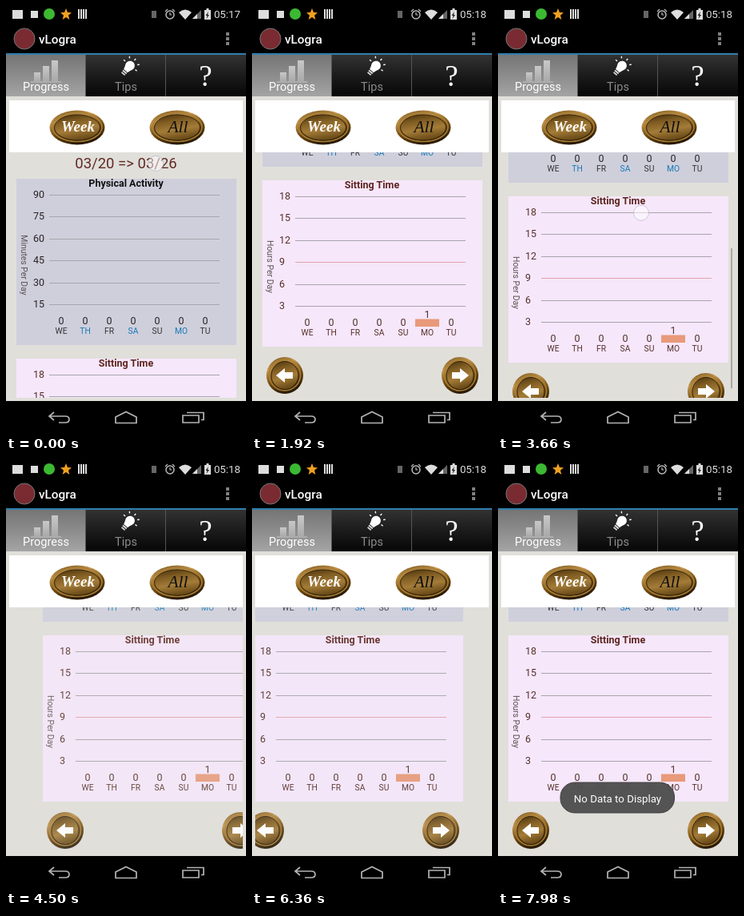
Animation, 300 px wide and 534 px high, one loop 8000 ms. Source, as an HTML page:

```html
<!DOCTYPE html>
<html lang="en">
<head>
<meta charset="utf-8">
<title>vLogra</title>
<style>
html, body { margin: 0; height: 100%; overflow: hidden; background: #000; }
svg { display: block; width: 100vw; height: 100vh; font-family: Roboto, sans-serif; }
</style>
</head>
<body>
<svg id="stage" viewBox="0 0 300 534"></svg>
<script>
const LOOP = 8000, RANGE = 223, VIEW = 307, THUMB = 175;
const stage = document.getElementById('stage');

// ---------- drawing helpers ----------
const text = (x, y, s, size, fill, more = '') =>
  `<text x="${x}" y="${y}" font-size="${size}" fill="${fill}" text-anchor="middle" ${more}>${s}</text>`;
const rect = (x, y, w, h, fill, more = '') =>
  `<rect x="${x}" y="${y}" width="${w}" height="${h}" fill="${fill}" ${more}/>`;
const path = (d, fill, more = '') => `<path d="${d}" fill="${fill}" ${more}/>`;
const oval = (x, y, rx, ry, fill, more = '') =>
  `<ellipse cx="${x}" cy="${y}" rx="${rx}" ry="${ry}" fill="${fill}" ${more}/>`;
const gradient = (id, x2, ...stops) =>
  `<linearGradient id="${id}" x2="${x2}" y2="1">${stops.map((c, i) =>
    `<stop offset="${i / (stops.length - 1)}" stop-color="${c}"/>`).join('')}</linearGradient>`;
const gold = (x, y, rx, ry) =>
  oval(x, y, rx, ry, 'url(#rim)') +
  oval(x, y - .5, rx - 3.5, ry - 3.5, 'none', 'stroke="#a87f36" stroke-width="1.5"') +
  oval(x, y, rx - 6, ry - 5.5, 'url(#face)', 'stroke="#35230a"');

function chart({ y, bg, name, ink, ticks, tickInk, unit, days, limit, bar }) {
  let s = rect(13, 0, 275, 208, bg) +
    text(150, 10, name, 12.5, ink, 'font-weight="700"') +
    text(0, 0, unit, 10.4, '#5a5050', 'transform="translate(18.5 108) rotate(90)"');
  ticks.forEach((v, i) => {
    const ly = Math.floor(20 + 27.5 * i);
    s += rect(54, ly, 213, 1, i === limit ? '#e3a3ac' : '#a8a5ac') +
      text(34, ly + 3.5, v, 12.5, tickInk, 'style="text-anchor:start"');
  });
  ['WE', 'TH', 'FR', 'SA', 'SU', 'MO', 'TU'].forEach((d, i) => {
    const x = 69 + 30 * i;
    s += i === bar
      ? rect(x - 15, 173.5, 30, 9.5, '#e89a7a') + text(x, 171.5, 1, 12.5, tickInk)
      : text(x, 181.5, 0, 12.5, tickInk);
    s += text(x, 193.5, d, 10.3, days[i % 2]);
  });
  return `<g transform="translate(0 ${y})">${s}</g>`;
}

const arrow = (x, flip) => gold(x, 685, 23, 23) +
  path('M-11 0 0 -9V-4H10V4H0V9Z', '#fff', `transform="translate(${x} 685) scale(${flip} 1)"`);

// ---------- fixed parts ----------
const statusBar =
  rect(8, 5, 13, 11, '#ddd') + rect(31, 6, 9, 9, '#ddd') +
  oval(54, 10, 7, 7, '#3cb932') +
  path('M75 3l2 5 5 .3-4 3.4 1.4 5.3-4.4-3-4.4 3 1.4-5.3-4-3.4 5-.3z', '#f0a020') +
  [90, 93, 96, 99].map(x => rect(x, 4, 2, 12, '#ddd')).join('') +
  rect(182, 6, 6, 9, '#666') +
  oval(205, 11, 5, 5, 'none', 'stroke="#bbb" stroke-width="1.5"') +
  path('M205 8v3h2.5M199 7l3-3M211 7l-3-3', 'none', 'stroke="#bbb" stroke-width="1.2"') +
  path('M216 8Q224 1 232 8L224 17Z', '#ddd') +
  path('M233 16H244V5Z', '#666') + path('M233 16H239V10Z', '#ddd') +
  path('M248 5h2.5V3h3v2H256V17H248Z', '#ddd') +
  path('M253 7l-3.5 5h2l-1 4 3.5-5h-2z', '#222') +
  '<text id="clock" x="293" y="15" font-size="13.3" fill="#ddd" text-anchor="end"></text>';

const header =
  oval(23, 41, 13, 13, '#792b31', 'stroke="#777"') +
  text(41, 46.5, 'vLogra', 15.3, '#fff', 'style="text-anchor:start" font-weight="500"') +
  [35, 41, 47].map(y => rect(275, y - 2, 4, 4, '#808080')).join('');

const tabs =
  rect(0, 59, 300, 54, 'url(#dark)') + rect(0, 61, 99, 52, 'url(#lit)') +
  rect(0, 59, 300, 2, '#2f7fae') +
  rect(99, 61, 1, 52, '#555') + rect(199, 61, 1, 52, '#555') +
  [83, 75, 68].map((y, i) => rect(35 + 11 * i, y, 8, 95 - y, 'url(#column)')).join('') +
  rect(31, 94, 38, 2, '#adadad') +
  text(50, 106, 'Progress', 14.5, '#fff') + text(150, 106, 'Tips', 14.5, '#8c8c8c') +
  '<g transform="translate(153 77) rotate(40) scale(.9)">' +
  path('M-3.5 6Q-4 3-6-1A6.5 6.5 0 1 1 6-1Q4 3 3.5 6Z', '#fff') +
  rect(-3.5, 7, 7, 2, '#ddd') + rect(-3, 10, 6, 2, '#ddd') +
  path('M-12-4h3M9-4h3M-9-13l2 2M9-13l-2 2M0-16v3', 'none', 'stroke="#fff" stroke-width="1.5"') + '</g>' +
  text(249.5, 100, '?', 37, '#fff', 'font-family="Liberation Serif, serif"');

const topButtons = rect(4, 118, 292, 65, '#fff') +
  gold(89, 152, 34.5, 21.5) + gold(214, 152, 34.5, 21.5) +
  text(90, 157, 'Week', 19, '#fff',
    'font-family="Liberation Serif, serif" font-style="italic" font-weight="700"') +
  text(215, 157.5, 'All', 21.5, '#111', 'font-family="Liberation Serif, serif" font-style="italic"');

const content =
  text(150, 203, '03/20 =&gt; 03/26', 18.5, '#632b27') +
  chart({ y: 216, bg: '#cfcfdc', name: 'Physical Activity', ink: '#111', unit: 'Minutes Per Day',
    ticks: [90, 75, 60, 45, 30, 15], tickInk: '#2a2224', days: ['#333', '#1779b5'] }) +
  chart({ y: 441, bg: '#f6e7fb', name: 'Sitting Time', ink: '#5e261f', unit: 'Hours Per Day',
    ticks: [18, 15, 12, 9, 6, 3], tickInk: '#55302a', days: ['#55302a', '#55302a'], limit: 3, bar: 5 }) +
  arrow(41, 1) + arrow(260, -1);

const navBar = rect(0, 494, 300, 40, '#000') +
  '<g fill="none" stroke="#b4b4b4" stroke-width="1.7">' +
  '<path d="M60 508l-6 5 6 5M54 513H74q5 0 5 4t-5 4H66"/>' +
  '<path d="M137 514l13-6.500 13 6.500v7.500h-26z"/>'.replace(/00/g, '') +
  '<path d="M221 512h20v9h-20zM226 508.5h21v9h-3"/></g>';

stage.innerHTML = `<defs>
  ${gradient('rim', .4, '#6d4a16', '#c1934a', '#70490f', '#2b1b05')}
  ${gradient('face', .3, '#46300c', '#7f5c22', '#a47c38', '#6e4e1a')}
  ${gradient('dark', 0, '#343434', '#1c1c1c', '#060606')}
  ${gradient('lit', 0, '#757575', '#8c8c8c', '#a4a4a4')}
  ${gradient('column', 0, '#c8c8c8', '#a8a8a8')}
  <clipPath id="view">${rect(4, 183, 292, VIEW, '#000')}</clipPath></defs>
  ${rect(0, 0, 300, 534, '#000')}${rect(0, 113, 300, 381, '#e0dfda')}
  <g clip-path="url(#view)"><g id="page">${content}</g>
  ${rect(291, 183, 2, THUMB, '#8b8b8b', 'id="thumb"')}</g>
  ${statusBar}${header}${tabs}${topButtons}${navBar}
  <g id="toast">${rect(78, 402, 142.5, 38, '#505050', 'rx="18" stroke="#3b3b3b"')}
  ${text(149.5, 426.5, 'No Data to Display', 13.3, '#fff')}</g>
  <circle id="finger" r="9.5" fill="#fff" fill-opacity=".5" stroke="#aaa9bb" stroke-opacity=".55"/>`;

// ---------- motion ----------
const clamp = v => Math.max(0, Math.min(1, v));
const $ = id => document.getElementById(id);
const [page, thumb, clock, toast, finger] = ['page', 'thumb', 'clock', 'toast', 'finger'].map($);

const flings = [[690, 1], [2130, 0], [3500, 1], [4770, 0], [5730, 1]];    // start, 1 = to the bottom
const slides = [[1600, -1], [4295, 1], [6140, -1], [6545, 1]];            // start, side it enters from
const touches = [                                                        // start, end, from, to
  [-60, 460, 182, 197, 227, 197],
  [690, 870, 179, 460, 179, 235],
  [1380, 1590, 100, 310, 215, 310],
  [2130, 2310, 180, 240, 180, 440],
  [2940, 3300, 167, 197, 227, 197],
  [3500, 3680, 179, 460, 179, 235],
  [4080, 4270, 215, 310, 100, 310],
  [4770, 4950, 180, 240, 180, 440],
  [5160, 5520, 167, 197, 227, 197],
  [5730, 5910, 179, 460, 179, 235],
  [5980, 6130, 100, 310, 215, 310],
  [7300, 7480, 260, 462, 260, 462]
];

function draw(t) {
  let scroll = 0, bar = 0;
  for (const [start, down] of flings) {
    if (t < start) break;
    const p = 1 - (1 - clamp((t - start) / 290)) ** 3;
    scroll = Math.round(RANGE * (down ? p : 1 - p));
    bar = 1 - clamp((t - start - 400) / 200);
  }
  let shift = 0, alpha = 1;
  for (const [start, side] of slides) {
    if (t < start || t > start + 300) continue;
    const rest = (1 + Math.cos(Math.PI * (t - start) / 300)) / 2;
    shift = Math.round(side * 146 * rest);
    alpha = 1 - rest ** 1.3;
  }
  page.setAttribute('transform', `translate(${shift} ${-scroll})`);
  page.setAttribute('opacity', alpha);
  thumb.setAttribute('y', 183 + scroll / RANGE * (VIEW - THUMB));
  thumb.setAttribute('opacity', bar * .65);

  const touch = touches.find(([a, b]) => t >= a && t < b + 80);
  finger.setAttribute('opacity', 0);
  if (touch) {
    const [a, b, x0, y0, x1, y1] = touch, p = clamp((t - a) / (b - a));
    finger.setAttribute('cx', x0 + (x1 - x0) * p);
    finger.setAttribute('cy', y0 + (y1 - y0) * p);
    finger.setAttribute('opacity', clamp((t - a) / 40) * clamp((b + 80 - t) / 80));
  }
  clock.textContent = t < 1000 ? '05:17' : '05:18';
  toast.setAttribute('opacity', clamp((t - 7620) / 300) * .97);
}

const begin = performance.now();
function tick() {
  draw((performance.now() - begin) % LOOP);
  requestAnimationFrame(tick);
}
tick();
</script>
</body>
</html>
```
